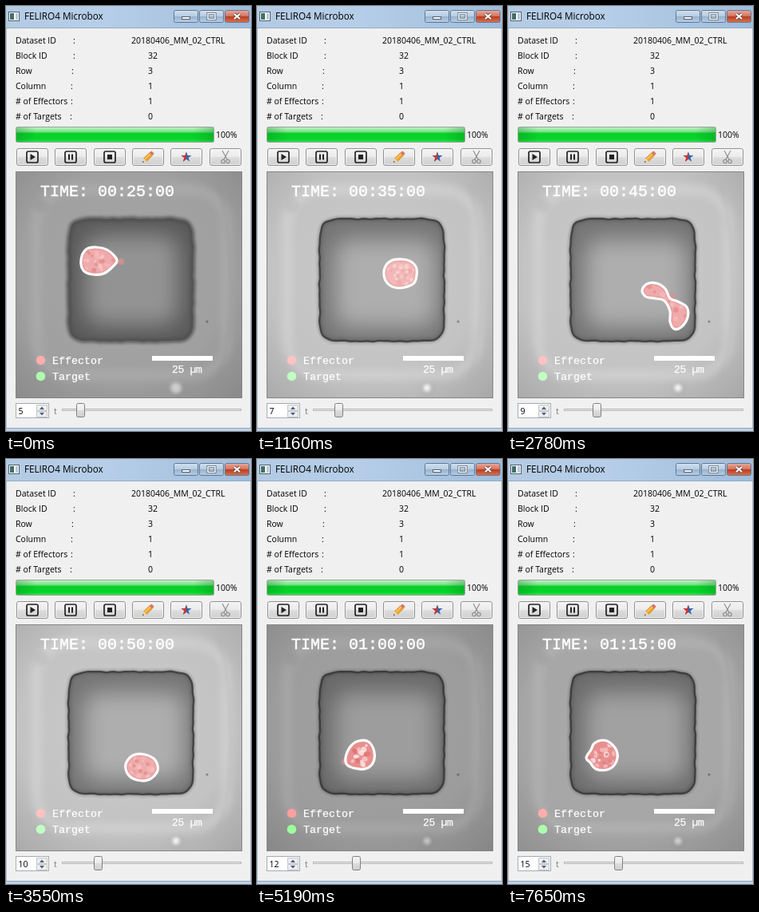
Write an HTML page that moves like this. It is 307 by 532 pixels and loops after 8 s.

```html
<!DOCTYPE html>
<html lang="en">
<head>
<meta charset="utf-8">
<title>FELIRO4 Microbox</title>
<style>
html, body { margin: 0; width: 100%; height: 100%; overflow: hidden; background: #f0f0f0; }
svg { display: block; width: 307px; height: 532px; }
text { font: 10.5px "Open Sans", "Noto Sans", sans-serif; white-space: pre; }
.mono text { font: 13.33px "Liberation Mono", "Courier New", monospace; fill: #fff; stroke: #fff; stroke-width: .25px; }
.mono #clock { font-size: 20px; stroke-width: .5px; }
.mono #scale { font-size: 13px; letter-spacing: -.3px; }
</style>
</head>
<body>
<svg id="stage" viewBox="0 0 307 532">
  <defs>
    <linearGradient id="title" x2="1" y2="0">
      <stop stop-color="#b3cae3"/><stop offset=".4" stop-color="#b6cee8"/><stop offset="1" stop-color="#9fbcdc"/>
    </linearGradient>
    <linearGradient id="button" x2="0" y2="1">
      <stop stop-color="#f4f4f4"/><stop offset=".48" stop-color="#ebebeb"/>
      <stop offset=".52" stop-color="#dddddd"/><stop offset="1" stop-color="#cfcfcf"/>
    </linearGradient>
    <linearGradient id="caption" x2="0" y2="1">
      <stop stop-color="#d0e0f0"/><stop offset=".5" stop-color="#b7cce2"/>
      <stop offset=".52" stop-color="#98b3cf"/><stop offset="1" stop-color="#b7cee6"/>
    </linearGradient>
    <linearGradient id="close" x2="0" y2="1">
      <stop stop-color="#e9a99b"/><stop offset=".48" stop-color="#d4735f"/>
      <stop offset=".52" stop-color="#bd3a20"/><stop offset="1" stop-color="#d7754f"/>
    </linearGradient>
    <linearGradient id="progress" x2="0" y2="1">
      <stop stop-color="#c4f3c8"/><stop offset=".3" stop-color="#7be389"/>
      <stop offset=".42" stop-color="#0ccf2b"/><stop offset=".8" stop-color="#02d528"/><stop offset="1" stop-color="#3fe05a"/>
    </linearGradient>
    <linearGradient id="progressEnds" x2="1" y2="0" stop-color="#077a1c">
      <stop stop-color="#067a1c" stop-opacity=".3"/><stop offset=".1" stop-color="#067a1c" stop-opacity="0"/>
      <stop offset=".9" stop-color="#067a1c" stop-opacity="0"/><stop offset="1" stop-color="#067a1c" stop-opacity=".3"/>
    </linearGradient>
    <radialGradient id="fieldShade" cx=".48" cy=".45" r=".75">
      <stop stop-color="#cacaca"/><stop offset=".62" stop-color="#c3c3c3"/><stop offset="1" stop-color="#a8a8a8"/>
    </radialGradient>
    <filter id="soft2" x="-50%" y="-50%" width="200%" height="200%"><feGaussianBlur stdDeviation="2"/></filter>
    <filter id="soft5" x="-50%" y="-50%" width="200%" height="200%"><feGaussianBlur stdDeviation="5"/></filter>
    <filter id="soft14" x="-50%" y="-50%" width="200%" height="200%"><feGaussianBlur stdDeviation="14"/></filter>
    <clipPath id="viewClip"><rect x="13" y="208" width="282" height="282"/></clipPath>
    <clipPath id="wellClip"><path class="well"/></clipPath>
    <clipPath id="cellClip"><path class="cell"/></clipPath>
  </defs>

  <rect width="307" height="532" fill="#f0f0f0"/>
  <rect width="307" height="28" fill="url(#title)"/>
  <rect y="27" width="307" height="1" fill="#93abc4"/>
  <path d="M.5 28V528M306.5 28V528" stroke="#a8c0d8"/>
  <rect y="528" width="307" height="4" fill="#bdd3e9"/>
  <path d="M0 528.5H307" stroke="#8ea6bf"/>
  <g id="chrome"></g>
  <g id="labels"></g>

  <rect x="12.5" y="151.5" width="248" height="19" rx="2" fill="url(#progress)" stroke="#9ba39b"/>
  <rect x="13" y="152" width="247" height="18" fill="url(#progressEnds)"/>
  <text x="263" y="165">100%</text>
  <g id="buttons"></g>

  <rect x="12" y="207" width="284" height="284" fill="#858585"/>
  <g clip-path="url(#viewClip)">
    <g id="field">
      <rect x="13" y="208" width="282" height="282" fill="url(#fieldShade)"/>
      <rect x="38" y="230" width="238" height="232" rx="44" fill="none" stroke="#dadada" stroke-width="13" opacity=".5" filter="url(#soft5)"/>
      <path d="M266 225Q280 265 281 345T266 462" fill="none" stroke="#a4a4a4" stroke-width="2" opacity=".35" filter="url(#soft2)"/>
      <circle cx="44" cy="250" r="9" fill="#b0b0b0" opacity=".35" filter="url(#soft2)"/>
      <path class="well" fill="none" stroke="#d4d4d4" stroke-width="9" filter="url(#soft2)"/>
      <circle cx="252" cy="395" r="1.6" fill="#858585"/>
      <circle cx="214" cy="480" r="9" fill="#b2b2b2" filter="url(#soft2)"/>
      <circle id="glint" cx="213" cy="478" filter="url(#soft2)" fill="#fafafa"/>
    </g>
    <g id="pit">
      <g clip-path="url(#wellClip)">
        <path id="wellFloor" class="well"/>
        <rect id="wellGlow" rx="18" filter="url(#soft14)"/>
      </g>
      <path id="wellRim" class="well" fill="none" stroke="#555" stroke-width="5" filter="url(#soft2)"/>
      <path id="wellEdge" class="well" fill="none" stroke="#444" stroke-width="2.4"/>
    </g>
    <g id="halo"></g>
    <path id="cellFill" class="cell"/>
    <g clip-path="url(#cellClip)">
      <g id="spots"></g>
      <path id="cellRim" class="cell" fill="none" stroke-width="6" opacity=".7"/>
    </g>
    <path class="cell" fill="none" stroke="#fff" stroke-width="3.2" stroke-linejoin="round"/>
    <g class="mono">
      <text id="clock" x="43" y="238"></text>
      <circle id="effectorDot" cx="43.5" cy="443.5" r="5.8"/>
      <text x="58" y="448">Effector</text>
      <circle id="targetDot" cx="43.5" cy="463.5" r="5.8"/>
      <text x="58" y="468">Target</text>
      <rect x="183" y="438" width="76" height="6" fill="#fff"/>
      <text id="scale" x="208" y="459">25 µm</text>
    </g>
  </g>

  <rect x="12.5" y="497.5" width="41" height="18" fill="#fff" stroke="#a5acb5"/>
  <path d="M38.5 499.5h13v7h-13zM38.5 507.5h13v7h-13z" fill="#eee" stroke="#c6c6c6"/>
  <path d="M42 505l3-3.5 3 3.5zM42 509l3 3.5 3-3.5z" fill="#47608c"/>
  <text id="step" x="15.5" y="511"></text>
  <text x="60" y="511" fill="#777">t</text>
  <rect x="70.5" y="504.5" width="224" height="2" fill="#e7eaea" stroke="#b8b8b8"/>
  <rect id="thumb" y="497.5" width="10" height="17" rx="2" fill="url(#button)" stroke="#7f7f7f"/>
</svg>
<script>
const LOOP = 8000, FIRST_STEP = 5;
const CHANGES = [440, 1160, 1900, 2780, 3550, 4420, 5190, 6060, 6780, 7650];

// One pose per step: cell outline, field brightness, legend lightness, cell tone.
const POSES = [
  { outline: '94,318 100,305 113,302 128,306 139,318 133,327 122,335 108,336 97,331', light: .82, dot: 84, tone: 'rosy', tail: [144, 320] },
  { outline: '133,322 142,313 155,312 167,319 171,331 163,341 149,342 137,334', light: .92, dot: 86, tone: 'pale' },
  { outline: '160,328 168,319 181,317 193,320 200,329 198,345 189,351 178,353 167,350 160,341', light: 1, dot: 88, tone: 'pale' },
  { outline: '142,321 152,317 161,323 168,330 183,331 194,342 193,354 183,357 168,352 157,344 147,338 141,329', light: .88, dot: 84, tone: 'rosy', tail: [142, 321] },
  { outline: '168,356 174,348 186,347 197,354 203,366 213,370 224,377 225,390 217,402 208,404 203,395 203,382 196,369 184,366 173,364', light: 1, dot: 88, tone: 'rosy', tail: [205, 363] },
  { outline: '150,382 159,371 174,370 187,377 190,390 180,401 165,402 153,395', light: 1, dot: 88, tone: 'rosy' },
  { outline: '102,380 113,370 126,365 142,368 144,384 140,400 130,403 116,392', light: .96, dot: 86, tone: 'bright', tail: [129, 365] },
  { outline: '111,374 117,360 127,353 140,354 147,367 145,381 135,388 122,387 113,383', light: .8, dot: 81, tone: 'bright', tail: [110, 379] },
  { outline: '106,374 112,360 123,353 136,355 143,368 140,382 129,388 116,387', light: .8, dot: 81, tone: 'bright' },
  { outline: '102,373 108,359 120,352 133,356 140,368 137,382 126,389 112,387', light: .8, dot: 82, tone: 'bright' },
  { outline: '98,374 104,364 108,356 119,352 129,356 137,368 134,382 124,389 110,388 103,380', light: .85, dot: 84, tone: 'bright', tail: [135, 378] },
];
const TONES = {
  pale: { fill: '#f2b8b8', rim: '#ea9a9a', spots: ['#fadada', '#f6c8c8', '#eeaaaa'] },
  rosy: { fill: '#efabab', rim: '#e79494', spots: ['#f7c6c6', '#e38c8c', '#f5b8b8'] },
  bright: { fill: '#e88f8f', rim: '#e79090', spots: ['#fff0f0', '#e07474', '#f7c2c2'] },
};

const $ = id => document.getElementById(id);
const setAll = (selector, name, value) =>
  document.querySelectorAll(selector).forEach(el => el.setAttribute(name, value));
const setAttrs = (id, attrs) =>
  Object.entries(attrs).forEach(([name, value]) => $(id).setAttribute(name, value));
const parsePoints = s => s.split(' ').map(p => p.split(',').map(Number));

function seeded(seed) {
  return () => (seed = (seed * 16807) % 2147483647) / 2147483647;
}

function smoothClosed(points) {
  const at = i => points[(i + points.length) % points.length];
  const handle = (p, a, b) => [p[0] + (b[0] - a[0]) / 6, p[1] + (b[1] - a[1]) / 6];
  return 'M' + points[0] + points.map((p, i) => {
    const next = at(i + 1);
    return `C${handle(p, at(i - 1), next)} ${handle(next, at(i + 2), p)} ${next}`;
  }).join('') + 'Z';
}

function wellPath() {
  const points = Array.from({ length: 180 }, (_, i) => {
    const a = i * Math.PI / 90, c = Math.cos(a), s = Math.sin(a);
    const wobble = .25 * Math.sin(23 * a) + .25 * Math.sin(37 * a + 1) + .3 * Math.sin(11 * a);
    const r = (Math.abs(c) ** 9 + Math.abs(s) ** 9) ** (-1 / 9);
    return [156.5 + c * r * (78 + wobble), 343 + s * r * (76.5 + wobble)].map(v => +v.toFixed(1));
  });
  return 'M' + points.join('L') + 'Z';
}

function buildWindow() {
  const captionButton = (x, w, fill) =>
    `<rect x="${x}.5" y="5.5" width="${w}" height="15" rx="2" fill="url(#${fill})" stroke="#64788e"/>`;
  $('chrome').innerHTML = `
    <rect x="3.5" y="7.5" width="13" height="11" fill="#fff" stroke="#4d5f70"/>
    <rect x="5" y="9" width="5" height="8" fill="#3f7068"/>
    <rect x="12" y="9" width="3" height="8" fill="#b9c8d4"/>
    <text x="23" y="17" style="font-size:11.7px">FELIRO4 Microbox</text>
    ${captionButton(210, 30, 'caption')}${captionButton(242, 30, 'caption')}${captionButton(274, 30, 'close')}
    <rect x="220.5" y="13.5" width="10" height="3" fill="#fff" stroke="#53606e"/>
    <rect x="253" y="9.5" width="9" height="7" fill="none" stroke="#53606e" stroke-width="3"/>
    <rect x="253" y="9.5" width="9" height="7" fill="none" stroke="#fff" stroke-width="1.5"/>
    <path d="M286 10l7 6m0-6l-7 6" stroke="#6c4540" stroke-width="4"/>
    <path d="M286 10l7 6m0-6l-7 6" stroke="#fff" stroke-width="2.2"/>`;

  const rows = [
    ['Dataset ID', '20180406_MM_02_CTRL', 84], ['Block ID', '32', 84], ['Row', '3', 82],
    ['Column', '1', 81], ['# of Effectors', '1', 81], ['# of Targets', '0', 80],
  ];
  $('labels').innerHTML = rows.map(([label, value, colon], i) => {
    const y = 47 + i * 19;
    return `<text x="12" y="${y}">${label}</text><text x="${colon}" y="${y}">:</text>
      <text x="${i ? 178 : 157}" y="${y}">${value}</text>`;
  }).join('');

  const frame = '<rect x="-7" y="-7" width="14" height="14" rx="2" fill="none" stroke="#222" stroke-width="1.7"/>';
  const icons = [
    frame + '<path d="M-2.5-4L4 0-2.5 4z" fill="#222"/>',
    frame + '<path d="M-2-3.5v7M2-3.5v7" stroke="#222" stroke-width="2"/>',
    frame + '<rect x="-3" y="-3" width="6" height="6" fill="#222"/>',
    `<g transform="rotate(-45)"><rect x="-5" y="-2.5" width="10" height="5" fill="#f5a52b" stroke="#b8731e" stroke-width=".7"/>
      <path d="M-5-2.5L-10 0-5 2.5z" fill="#f2d5a0"/><path d="M-10 0l2-1v2z" fill="#333"/>
      <path d="M-5-.8H5" stroke="#ffd874"/><rect x="5" y="-2.5" width="3.5" height="5" rx="1" fill="#d87562"/></g>`,
    `<g transform="scale(.82)"><path d="M0-8L2-2.5 8-2.5 3.2 1.2 5 7 0 3.5-5 7-3.2 1.2-8-2.5-2-2.5z" fill="#2f66ad"/>
      <path d="M0-8V3.5L-5 7-3.2 1.2-8-2.5-2-2.5z" fill="#cf3434"/></g>`,
    `<g fill="none" stroke="#8a8a8a" stroke-width="1.1"><path d="M-4-8L2 3M4-8L-2 3"/>
      <circle cx="-3" cy="5.5" r="2.2"/><circle cx="3" cy="5.5" r="2.2"/></g>`,
  ];
  $('buttons').innerHTML = icons.map((icon, i) => {
    const x = Math.round(13 + i * 48.3);
    return `<rect x="${x + .5}" y="178.5" width="39" height="21" rx="2.5" fill="url(#button)" stroke="#929292"/>
      <rect x="${x + 1.5}" y="179.5" width="37" height="19" rx="2" fill="none" stroke="#fafafa" opacity=".7"/>
      <g transform="translate(${x + 20} 189)">${icon}</g>`;
  }).join('');
  setAll('.well', 'd', wellPath());
}

function drawWell(blurred) {
  setAttrs('wellFloor', { fill: blurred ? '#626262' : '#747474' });
  setAttrs('wellGlow', blurred
    ? { x: 99, y: 287, width: 117, height: 112, fill: '#a2a2a2' }
    : { x: 97, y: 292, width: 128, height: 110, fill: '#aeaeae' });
  setAttrs('wellRim', { opacity: blurred ? 1 : .6 });
  setAttrs('wellEdge', { opacity: blurred ? 0 : 1 });
  setAttrs('glint', { r: blurred ? 7 : 4.5 });
}

function drawCell(pose, index) {
  const points = parsePoints(pose.outline);
  const center = [0, 1].map(k => points.reduce((sum, p) => sum + p[k], 0) / points.length);
  const { fill, rim, spots } = TONES[pose.tone];
  const random = seeded(index * 97 + 31);
  setAll('.cell', 'd', smoothClosed(points));
  setAttrs('cellFill', { fill });
  setAttrs('cellRim', { stroke: rim });
  $('spots').innerHTML = Array.from({ length: 26 }, (_, i) => {
    const p = points[i % points.length], reach = .15 + .75 * random();
    const [x, y] = center.map((c, k) => c + (p[k] - c) * reach);
    return `<circle cx="${x}" cy="${y}" r="${1.5 + 2 * random()}" fill="${spots[i % 3]}" opacity=".75"/>`;
  }).join('');
  $('halo').innerHTML = pose.tail
    ? `<circle cx="${pose.tail[0]}" cy="${pose.tail[1]}" r="4" fill="#d99090" opacity=".8"/>` : '';
}

function draw(index) {
  const pose = POSES[index], step = FIRST_STEP + index, minutes = step * 5;
  const pad = n => String(n).padStart(2, '0');
  $('clock').textContent = `TIME: ${pad(Math.floor(minutes / 60))}:${pad(minutes % 60)}:00`;
  $('step').textContent = step;
  $('thumb').setAttribute('x', Math.round(88 + index * 4.47) + .5);
  $('field').style.filter = `brightness(${pose.light})`;
  $('pit').style.filter = `brightness(${(1 + pose.light) / 2})`;
  $('effectorDot').setAttribute('fill', `hsl(0 100% ${pose.dot}%)`);
  $('targetDot').setAttribute('fill', `hsl(120 100% ${pose.dot}%)`);
  drawWell(index === 0);
  drawCell(pose, index);
}

let shown = -1;
function tick() {
  const time = performance.now() % LOOP;
  const index = CHANGES.filter(change => change <= time).length;
  if (index !== shown) draw(shown = index);
  requestAnimationFrame(tick);
}

buildWindow();
tick();
</script>
</body>
</html>
```
